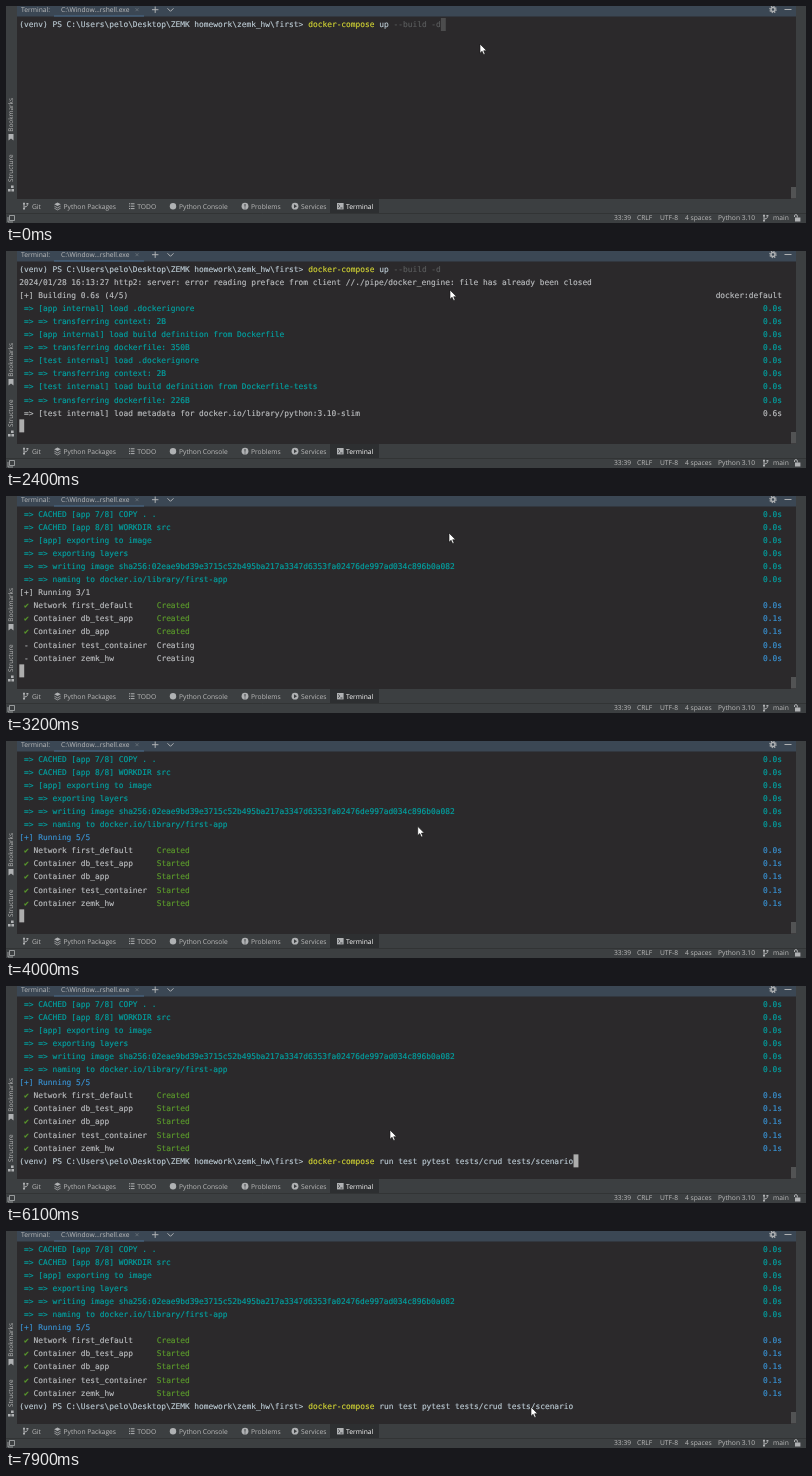
An HTML page that plays this animation: 800x217 px, repeating every 8 s.

```html
<!DOCTYPE html>
<html lang="en">
<head>
<meta charset="utf-8">
<style>
  html, body { margin: 0; width: 100%; height: 100%; overflow: hidden; background: #3c3f41; }
  svg { display: block; width: 800px; height: 217px; }
  text { text-rendering: geometricPrecision; white-space: pre; }
  .ui { font: 6.7px "Open Sans", "Noto Sans", sans-serif; fill: #bbbbbb; }
  .side { font-size: 6.4px; }
  .term { font: 7.868px "DejaVu Sans Mono", "Noto Sans Mono", monospace; stroke-width: .15; }
  .line { fill: none; stroke: #afb1b3; }
  .solid { fill: #afb1b3; }
</style>
</head>
<body>
<svg viewBox="0 0 800 217">
  <rect width="800" height="217" fill="#3c3f41"/>
  <rect x="11" y="10" width="779" height="183" fill="#2b292b"/>
  <rect x="785" y="181" width="5" height="11.5" fill="#525354"/>

  <!-- tab bar -->
  <rect x="11" width="779" height="10.5" fill="#3b4754"/>
  <rect x="48" y="9.5" width="90" height="1" fill="#4a6d8c"/>
  <path class="line" d="M129.5 2.2l3 3m0-3l-3 3" stroke-width=".7" opacity=".45"/>
  <path class="line" d="M146 3.7h6.4m-3.2-3.2v6.4M161.5 2.3l3 3 3-3M778.5 3.5h7"/>
  <circle class="line" cx="767" cy="3.4" r="2" stroke-width="1.5"/>
  <circle class="line" cx="767" cy="3.4" r="3.2" stroke-width="1.2" stroke-dasharray="1.25 1.26"/>

  <!-- side bar -->
  <path class="solid" d="M2.5 128h5v6.5l-2.5-2-2.5 2z"/>
  <path class="solid" d="M5 179.5h2.6v2.6H5zM2 183h2.6v2.6H2zM5.4 183H8v2.6H5.4z"/>

  <!-- tool bar -->
  <rect x="324" y="193" width="49" height="14" fill="#2d2f31"/>
  <path d="M0 207.5h800" stroke="#323435"/>
  <g id="branch" class="line">
    <path d="M18 198v5M21.4 198.5v.8q0 1.4-3.2 1.8"/>
    <path d="M17 197.6h2m-2 5.2h2m1.4-5h2" stroke-width="1.6"/>
  </g>
  <use href="#branch" x="740" y="12"/>
  <path class="solid" d="M48.2 198.3l3.3-1.8 3.3 1.8-3.3 1.8z"/>
  <path class="line" d="M48.4 200.2l3.1 1.7 3.1-1.7m-6.2 2l3.1 1.7 3.1-1.7" stroke-width=".8"/>
  <path class="line" d="M123 197.8h1m.7 0h3.8M123 200.2h1m.7 0h3.8M123 202.6h1m.7 0h3.8"/>
  <circle class="solid" cx="167" cy="200.2" r="3.2"/>
  <circle class="solid" cx="239" cy="200.2" r="3.4"/>
  <path d="M239 198v2.7m0 .8v1" stroke="#3c3f41"/>
  <circle class="solid" cx="289" cy="200.2" r="3.4"/>
  <path d="M288 198.2l3 2-3 2z" fill="#3c3f41"/>
  <rect class="solid" x="331" y="197" width="6.6" height="6.4"/>
  <path d="M332.2 198.5l1.6 1.6-1.6 1.6m2.2.3h2" fill="none" stroke="#2d2f31" stroke-width=".8"/>

  <!-- status bar -->
  <path class="line" d="M3.5 209.5h5v5h-5zM2 211v5h5" stroke-width=".8"/>
  <rect class="solid" x="789" y="211.5" width="5.4" height="4"/>
  <path class="line" d="M788.5 211v-1a1.4 1.4 0 0 1 2.8 0v1.5"/>

  <g id="labels" class="ui"></g>
  <g id="term" class="term"></g>
  <path id="mouse" d="M0 0v9.2l2.1-2 1.5 3.4 1.5-.7-1.4-3.2h2.9z" fill="#fff" stroke="#111" stroke-width=".6"/>
</svg>

<script>
const LOOP = 8000, STEP = 100;
const LEFT = 13.3, COL = 4.737, ROW = 13.03;
const FG = '#bcbec0', PATH = '#bccbd4', TEAL = '#00a3a3', BLUE = '#3993d4', GREEN = '#5c9c2c',
      YELLOW = '#d3d534', DIM = '#5a5c5d', CARET = '#adadad', CARET_DIM = '#4c4c4d';
const $ = id => document.getElementById(id);

const labels = [
  [15, 6.3, 'Terminal:'], [55, 6.3, 'C:\\Window...rshell.exe'],
  [26, 202.7, 'Git'], [57.5, 202.7, 'Python Packages'], [131.3, 202.7, 'TODO'],
  [173, 202.7, 'Python Console'], [245, 202.7, 'Problems'],
  [295, 202.7, 'Services'], [340, 202.7, 'Terminal', '#ffffff'],
  [608, 214.4, '33:39'], [631, 214.4, 'CRLF'], [654, 214.4, 'UTF-8'],
  [679, 214.4, '4 spaces'], [712, 214.4, 'Python 3.10'], [767, 214.4, 'main']
];
const sideLabels = [[125.7, 'Bookmarks'], [176, 'Structure']];
$('labels').innerHTML =
  labels.map(([x, y, s, fill = '#bbbbbb']) => `<text x="${x}" y="${y}" fill="${fill}">${s}</text>`).join('') +
  sideLabels.map(([y, s]) => `<text class="side" transform="translate(7.4 ${y}) rotate(-90)">${s}</text>`).join('');

// A row is a list of [column, text, colour].
const timed = (text, time, color = TEAL) => [[1, text, color], [157, time, color]];
const done = text => timed('=> ' + text, '0.0s');

const prompt = (args, hint = '') => [
  [0, '(venv) PS C:\\Users\\pelo\\Desktop\\ZEMK homework\\zemk_hw\\first>', PATH],
  [61, 'docker-compose', YELLOW],
  [76, args, PATH],
  [79, hint, DIM]
];
const upPrompt = prompt('up', '--build -d');
const runPrompt = prompt('run test pytest tests/crud tests/scenario');

const buildSteps = [
  ['app internal', '.dockerignore', 'context: 2B'],
  ['app internal', 'build definition from Dockerfile', 'dockerfile: 350B'],
  ['test internal', '.dockerignore', 'context: 2B'],
  ['test internal', 'build definition from Dockerfile-tests', 'dockerfile: 226B']
].flatMap(([stage, what, sent]) => [done(`[${stage}] load ${what}`), done(`=> transferring ${sent}`)]);

const exported = [
  'CACHED [app 7/8] COPY . .',
  'CACHED [app 8/8] WORKDIR src',
  '[app] exporting to image',
  '=> exporting layers',
  '=> writing image sha256:02eae9bd39e3715c52b495ba217a3347d6353fa02476de997ad034c896b0a082',
  '=> naming to docker.io/library/first-app'
].map(done);

const services = ['Network first_default', 'Container db_test_app', 'Container db_app',
  'Container test_container', 'Container zemk_hw'];

function building(t) {
  const rows = [upPrompt,
    [[0, '2024/01/28 16:13:27 http2: server: error reading preface from client //./pipe/docker_engine: file has already been closed', FG]]];
  if (t < 1800) return rows;
  const secs = ((t - 1800) / 1000).toFixed(1) + 's';
  const ready = t >= 1900;
  rows.push([[0, `[+] Building ${secs} (${ready ? '4/5' : '0/0'})`, FG], [147, 'docker:default', FG]]);
  if (ready) rows.push(...buildSteps,
    timed('=> [test internal] load metadata for docker.io/library/python:3.10-slim', secs, FG));
  return rows;
}

function running(t) {
  const finished = t >= 4000;
  const ready = t < 3000 ? 0 : t < 3100 ? 1 : t < 3400 ? 3 : 5;
  const shown = t < 3000 ? 1 : 5;
  const head = [[0, `[+] Running ${finished ? '5/5' : ready + '/1'}`, finished ? BLUE : FG]];
  const rows = services.slice(0, shown).map((name, i) => {
    const ok = i < ready;
    const status = !ok ? 'Creating' : i && t >= 3600 + i * 80 ? 'Started' : 'Created';
    return [[1, ok ? '✔' : '-', ok ? GREEN : FG], [3, name, FG],
      [29, status, ok ? GREEN : FG], [157, i && ok ? '0.1s' : '0.0s', BLUE]];
  });
  return [...exported, head, ...rows];
}

// Returns the rows, the caret column and colour, and the caret row if it is not the last.
function screen(t) {
  if (t < 1700) return [[upPrompt], 89, CARET_DIM];
  const rows = t < 2800 ? building(t) : running(t);
  if (t < 4200) return [rows, 0, CARET, rows.length];
  return t < 5600 ? [[...rows, upPrompt], 89, CARET] : [[...rows, runPrompt], 117, CARET];
}

const path = [[0, 474, 38], [1300, 444, 44], [2400, 444, 39], [3200, 443, 37],
  [5000, 368, 153], [6100, 384, 144], [6300, 384, 144], [7900, 525, 176]];

function mouseAt(t) {
  let i = 1;
  while (i < path.length - 1 && path[i][0] < t) i++;
  const [t0, x0, y0] = path[i - 1], [t1, x1, y1] = path[i];
  const p = Math.min(1, (t - t0) / (t1 - t0)), e = p * p * (3 - 2 * p);
  return [x0 + (x1 - x0) * e, y0 + (y1 - y0) * e];
}

let last = -1;
function draw(now) {
  const t = Math.floor(now % LOOP / STEP) * STEP;
  if (t !== last) {
    last = t;
    const [rows, col, color, row = rows.length - 1] = screen(t);
    const caret = t % 1000 < 500
      ? `<rect x="${LEFT + col * COL}" y="${12 + row * ROW}" width="4.9" height="13" fill="${color}"/>` : '';
    $('term').innerHTML = caret + rows.map((cells, r) => cells.map(([c, s, fill]) =>
      `<text x="${LEFT + c * COL}" y="${21.2 + r * ROW}" fill="${fill}" stroke="${fill}">${s}</text>`).join('')).join('');
    $('mouse').setAttribute('transform', `translate(${mouseAt(t)})`);
  }
  requestAnimationFrame(draw);
}
draw(performance.now());
</script>
</body>
</html>
```
